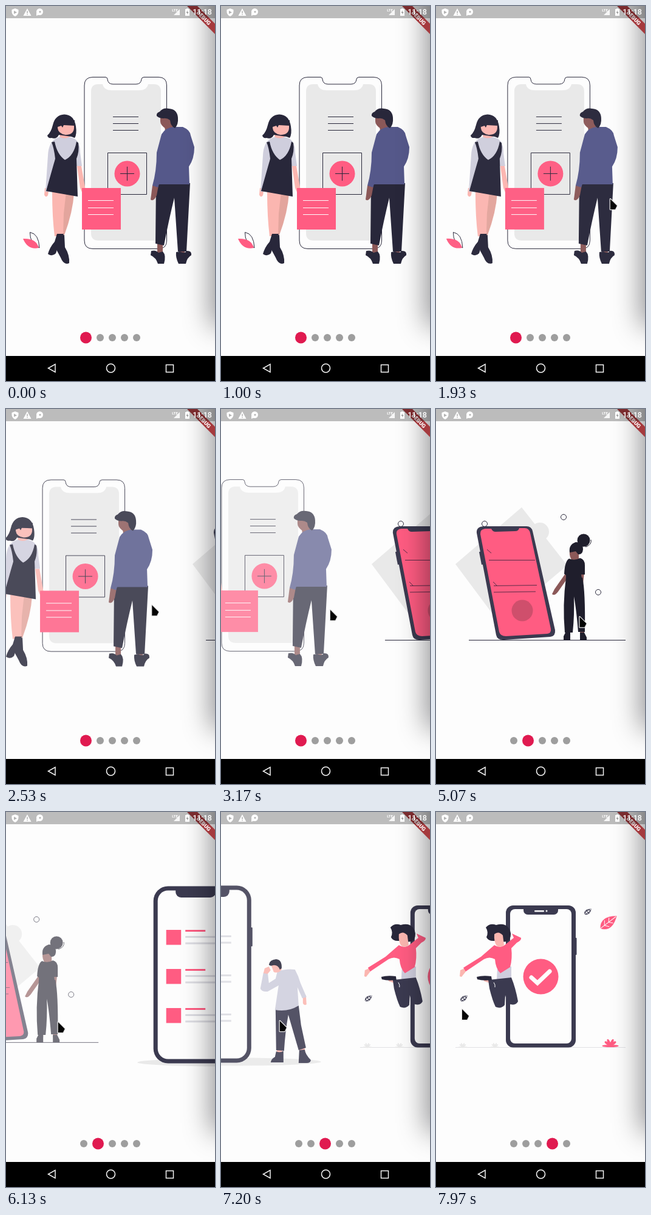
Recreate the animation shown at these times as an HTML page with a canvas. Size 344 by 614 pixels, loop 8 s.

```html
<!DOCTYPE html>
<html lang="en">
<head>
<meta charset="utf-8">
<title>Onboarding pager</title>
<style>
  html, body { margin: 0; width: 100%; height: 100%; overflow: hidden; background: #fdfdfd; }
  canvas { display: block; width: 344px; height: 614px; }
</style>
</head>
<body>
<canvas id="stage"></canvas>
<script>
const W = 344, H = 614, LOOP = 8000;
const dpr = window.devicePixelRatio || 1;
const INK = '#28273a', SLATE = '#3b3a50', RED = '#ff5c82', PALE = '#e9e9e9',
      LILAC = '#cfcedd', PINK = '#fbb6b0', BROWN = '#8b5858', PAPER = '#fdfdfd';

function prepare(canvas) {
  canvas.width = W * dpr;
  canvas.height = H * dpr;
  const c = canvas.getContext('2d');
  c.scale(dpr, dpr);
  return c;
}
const screen = prepare(document.getElementById('stage'));
const layer = prepare(document.createElement('canvas'));
let g = screen;

// Drawing helpers
const fill = (d, color) => { g.fillStyle = color; g.fill(new Path2D(d)); };
const line = (d, color, width = 1) => {
  g.strokeStyle = color;
  g.lineWidth = width;
  g.stroke(new Path2D(d));
};
const rect = (x, y, w, h, color) => { g.fillStyle = color; g.fillRect(x, y, w, h); };
const round = (x, y, w, h, r, color) => {
  g.fillStyle = color;
  g.beginPath();
  g.roundRect(x, y, w, h, r);
  g.fill();
};
const oval = (x, y, rx, ry, color, turn = 0) => {
  g.fillStyle = color;
  g.beginPath();
  g.ellipse(x, y, rx, ry, turn, 0, 7);
  g.fill();
};
const disc = (x, y, r, color) => oval(x, y, r, r, color);
const ring = (x, y, r, color, width = 1) => {
  g.strokeStyle = color;
  g.lineWidth = width;
  g.beginPath();
  g.arc(x, y, r, 0, 7);
  g.stroke();
};
const at = (x, y, turn, draw) => {
  g.save();
  g.translate(x, y);
  g.rotate(turn);
  draw();
  g.restore();
};

// Timing helpers
const clamp = (v, a = 0, b = 1) => Math.min(b, Math.max(a, v));
const smooth = v => v * v * (3 - 2 * v);

// Monotone cubic curve through [time, value] keys
function curve(keys, t) {
  const n = keys.length;
  if (t <= keys[0][0]) return keys[0][1];
  if (t >= keys[n - 1][0]) return keys[n - 1][1];
  let i = 0;
  while (keys[i + 1][0] < t) i++;
  const rate = k => (keys[k + 1][1] - keys[k][1]) / (keys[k + 1][0] - keys[k][0]);
  const slope = k => {
    if (k === 0 || k === n - 1) return 0;
    const a = rate(k - 1), b = rate(k);
    return a * b > 0 ? 2 * a * b / (a + b) : 0;
  };
  const [t0, v0] = keys[i], [t1, v1] = keys[i + 1];
  const d = t1 - t0, u = (t - t0) / d, e = smooth(u);
  return v0 + (v1 - v0) * e
    + d * u * (1 - u) * ((1 - u) * slope(i) - u * slope(i + 1));
}

const scrollKeys = [[0, 0], [1850, 0], [1930, 11], [2500, 66], [3170, 128], [3835, 172],
  [4030, 258], [4200, 318], [4420, 344], [5350, 344], [5800, 425], [6130, 503.5],
  [6300, 575], [6480, 664], [6700, 688], [6850, 688], [7200, 835], [7400, 863],
  [7530, 935], [7700, 1012], [7900, 1032]];
const cursorX = [[1300, 350], [1750, 298], [1850, 298], [1930, 287], [2500, 243],
  [3170, 180], [3835, 138], [4030, 52], [4150, 36], [4500, 36], [5150, 245],
  [5350, 245], [5800, 164], [6130, 86], [6280, 36], [6450, 36], [6800, 244],
  [6850, 244], [7200, 97], [7400, 62], [7530, 43]];
const cursorY = [[1300, 340], [1930, 316], [3170, 329], [4030, 333], [5200, 341],
  [6130, 344], [7200, 342], [7600, 323]];
const turns = [3835, 6180, 7400];

function scanPage() {
  // Outlined phone
  fill('M152 128H159Q161 138 174 138H219Q232 138 234 128H243Q255 128 255 140V372Q255 384 243 384H152Q140 384 140 372V140Q140 128 152 128Z', PALE);
  line('M143 116.5H164Q167 117 167 120Q168 128 176 128H214Q222 128 223 120Q223 117 227 116.5H251Q264.5 116.5 264.5 130V384Q264.5 397.5 251 397.5H143Q129 397.5 129 384V130Q129 116.5 143 116.5Z', INK);
  line('M176 181.5H218M176 192.5H218M176 203.5H218', INK);
  line('M167.5 240.5H231.5V308.5H167.5Z', INK);
  disc(199.5, 274.5, 21, RED);
  line('M199.5 263V286M188 274.5H211', INK);

  // Woman
  fill('M97 306H112Q110 338 96 375L92 374L94 330Z', '#e3a59d');
  fill('M78 304H99L95 340L94 377H80Q76 345 76 304Z', PINK);
  fill('M84 373H95L87 391Q84 399 82 405Q76 411 69 406Q72 395 80 386Z', INK);
  fill('M83 375H96L97 395Q105 408 104 421Q95 425 90 412L84 401Z', INK);
  fill('M64 298H71L69 310Q65 315 63 309Z', PINK);
  fill('M117 262H124L130 296Q132 303 126 307L122 298Z', PINK);
  fill('M84 216Q96 210 112 217Q122 222 122 240L125 262H116L113 252H80L72 304H65L69 245Q70 222 84 216Z', LILAC);
  fill('M90 206H104L105 214Q96 219 88 214Z', PINK);
  fill('M75 223L80 222Q84 243 97 252Q112 245 116 222L119 224Q121 238 116 250L118 312L66 303Q73 278 81 250Q79 232 75 223Z', INK);
  fill('M96 177.5Q112 178 115 197Q117 210 113 216L108 214L87 211Q83 219 75 216Q69 217 68 212Q74 207 77 195Q81 178 96 177.5Z', INK);
  fill('M85 195H112V200Q111 211 98 211Q86 209 85 200Z', PINK);
  fill('M83 187H113V196L95 195L93 199L91 196L85 198Z', INK);

  // Card
  rect(125, 298, 64, 68, RED);
  line('M135 318.5H177M135 330.5H177M135 341.5H177', PAPER);

  // Leaves
  line('M39.5 370.5Q54 373 55 396Q39 389 39.5 370.5Z', INK);
  fill('M28 381Q50 380 54 396Q36 400 28 381Z', RED);

  // Man
  fill('M249 388H258V406H249ZM285 396H294V406H285Z', BROWN);
  fill('M247 290H303L297 402H283L277 314Q268 350 260 392L246 389Z', INK);
  fill('M239 401Q247 399 251 404L258 402Q264 408 260 422H250Q247 412 238 408ZM280 403L286 402Q295 406 297 401Q306 400 305 408Q298 412 296 422H284Q279 412 280 403Z', INK);
  fill('M241 294H251L248 310Q243 321 238 317Z', BROWN);
  fill('M261 196H279V206H262Z', BROWN);
  fill('M256 210Q263 199 275 198H291Q303 203 304 212L310 231Q310 250 301 263L302 292H252L250 297L241 294Q248 270 248 240Z', '#55588a');
  fill('M254 181L274 178L276 192Q272 199 263 201Q254 195 254 189Z', BROWN);
  fill('M248 180Q247 175 253 173Q259 166 268 168Q282 169 283 183Q284 194 278 200Q271 197 270 187Q265 183 259 184Q252 184 248 180Z', INK);
}

function gamePage() {
  g.translate(-86, 0);
  fill('M118 254L227 161L302 256L190 350Z', PALE);
  disc(257, 201, 15, PALE);
  [[166, 188], [296, 177], [353, 300]].forEach(([x, y]) => ring(x, y, 4.5, INK));
  line('M140 378.5H398', INK);

  // Leaning phone
  fill('M157 234L161 233L165 254L161 255Z', SLATE);
  fill('M164 192H235Q243 192 245 200L282 362Q283 372 274 373L198 378Q187 379 185 370L153 203Q152 193 164 192Z', SLATE);
  fill('M167 196H177Q179 201 184 201L216 200Q222 200 223 195H232Q239 195 241 203L275 360Q276 367 269 368L201 372Q192 372 190 365L159 205Q158 197 167 196Z', RED);
  line('M173 247.5H249M181 289.5L252 288.5M181 300L250 299M170 230L177 236M180 283L187 290', '#5a2c48');
  disc(228, 330, 17.5, '#cf4f6c');

  // Woman with a bun
  const dark = '#1f1e2c';
  fill('M300 268L306 272L287 299Q281 307 277 303L281 295Z', BROWN);
  fill('M323 268H330L328 286L322 293L319 284Z', BROWN);
  fill('M299 362H307V370H299ZM323 362H330V370H323Z', BROWN);
  fill('M306 232H321V248H310Q305 242 306 232Z', BROWN);
  disc(329, 215, 10.5, dark);
  line('M341 214Q343 222 332 226', dark);
  fill('M306 235Q304 222 316 218Q328 218 328 230Q327 239 320 238L316 233Z', dark);
  fill('M305 245Q314 249 323 244Q331 246 331 256V271H325L327 284H300V272L297 270Q298 249 305 245Z', dark);
  fill('M300 276H327Q332 298 331 365H320Q317 328 313 307Q314 337 311 366H298Q294 320 300 276Z', dark);
  fill('M299 366H307V378H296V372ZM323 366H330L334 374V378H323Z', dark);
}

function listPage() {
  oval(172, 410, 140, 6.5, PALE);
  round(195, 190, 4, 31, 1, SLATE);
  round(58.5, 121.5, 138.5, 290, 24, SLATE);
  round(65.5, 128.5, 124.5, 276, 17, PAPER);
  round(95, 125, 66, 15, [0, 0, 9, 9], SLATE);
  [193, 257, 321].forEach(y => {
    rect(79.5, y, 24.5, 24.5, RED);
    rect(111, y, 33, 3, RED);
    rect(111, y + 10, 53, 3, '#dcdce2');
    rect(111, y + 20.5, 53, 3, '#dcdce2');
  });

  // Thinking man
  g.translate(147, 0);
  fill('M92 386H101V397H92ZM128 384L137 383L139 394H130Z', PINK);
  fill('M135 302L140 301L141 316Q137 319 135 314Z', PINK);
  fill('M90 322L128 318L132 350L140 387L128 391L111 333Q106 360 104 392L91 391Z', SLATE);
  fill('M91 393Q98 396 103 392V411H82Q83 405 89 402ZM129 391L138 390Q139 398 148 407Q148 412 141 412H128Z', SLATE);
  fill('M93 262Q108 257 122 259Q128 270 131 281L141 304L134 306L126 288L128 318Q110 329 89 325L95 285L77 295Q67 296 65 290L70 264L77 263L79 281L90 274Z', LILAC);
  fill('M70 265L72 257L79 254L82 260L77 266Z', PINK);
  fill('M82 250L98 249L100 259Q95 266 87 263Z', PINK);
  fill('M79 251Q80 243 91 242Q101 243 100 257L97 259Q94 251 86 252Q81 254 79 251Z', INK);
}

function leaf(x, y, size, color) {
  at(x, y, -0.65, () => {
    g.scale(size, size);
    fill('M-1 0Q-.3 -1 1 0Q-.3 1 -1 0Z', color);
    line('M-1 0H.9M-.5 0L-.2 -.38M-.5 0L-.2 .38M0 0L.3 -.32M0 0L.3 .32', PAPER, 1 / size);
  });
}

function sprout(x, y, size, color) {
  [-1, -0.45, 0.45, 1].forEach(a => at(x, y, a, () => oval(0, -size * 0.55, size * 0.2, size * 0.5, color)));
  oval(x, y + 1, size * 1.3, size * 0.2, color);
}

function donePage() {
  line('M32 385.5H312', '#d4d4da', 0.7);
  round(228, 206, 3.5, 28, 1, SLATE);
  round(115, 153, 115, 232.5, 12, SLATE);
  round(122, 159, 101, 220, 8, PAPER);
  round(144, 156, 57, 12, [0, 0, 7, 7], SLATE);
  round(162, 161, 16, 2.5, 1, PAPER);
  disc(182, 162, 1.5, PAPER);
  disc(172.5, 269.5, 29, RED);
  g.lineCap = 'round';
  line('M157 271L167 280L187 261', PAPER, 7);
  g.lineCap = 'butt';
  leaf(250, 163, 7.5, SLATE);
  leaf(46, 305, 7.5, SLATE);
  leaf(284, 180.5, 17, RED);
  sprout(287, 382, 10.5, RED);
  sprout(44, 384, 6, PALE);
  sprout(97, 384, 6, PALE);

  // Jumping woman
  fill('M82 189Q89 181 99 185Q112 181 119 189Q126 198 121 209Q114 215 106 211L94 211Q86 211 83 205Q87 197 82 189Z', INK);
  fill('M40 259L47 256L50 260L42 270L39 269Z', PINK);
  fill('M78 271L91 274L92 281L79 277Z', PINK);
  fill('M101 254L124 253L124 275H100Z', LILAC);
  fill('M86 275L124 271Q131 288 135 310Q132 317 123 315Q117 314 114 300L113 316Q107 323 98 319Q93 309 88 289Z', SLATE);
  line('M95 279Q98 283 97 287', PAPER);
  fill('M67 270Q77 267 91 269L92 275Q78 277 68 274Z', INK);
  fill('M96 218Q106 224 114 217L128 206L125 199L140 206Q141 210 133 214L124 223Q126 240 122 254L106 264Q98 256 97 241Q88 236 79 241L49 261L45 255L74 237Z', RED);
  fill('M96 200Q103 194 110 202L112 218Q106 223 100 219Q95 213 96 200Z', PINK);
}

const pages = [
  { draw: scanPage, dim: 0.82 },
  { draw: gamePage, dim: 0.82 },
  { draw: listPage, dim: 0.3 },
  { draw: donePage, dim: 0.82 }
];

function drawPage(page, offset) {
  if (Math.abs(offset) >= W) return;
  const gone = clamp(-offset / W);
  g = layer;
  g.clearRect(0, 0, W, H);
  g.save();
  g.translate(offset, -2.4 * gone);
  page.draw();
  g.restore();
  g = screen;
  g.globalAlpha = 1 - page.dim * gone;
  g.drawImage(layer.canvas, 0, 0, W, H);
  g.globalAlpha = 1;
}

function drawDots(t) {
  const steps = turns.map(s => smooth(clamp((t - s) / 300)));
  const mix = (a, b, w) => Math.round(a + (b - a) * w);
  let x = 122;
  for (let i = 0; i < 5; i++) {
    const w = (i ? steps[i - 1] || 0 : 1) - (steps[i] || 0);
    const r = 6 + 3.5 * w;
    disc(x + r, 543, r, `rgb(${mix(158, 224, w)},${mix(158, 26, w)},${mix(158, 80, w)})`);
    x += 2 * r + 8;
  }
}

function drawCursor(t) {
  if (t < 1300) return;
  at(curve(cursorX, t), curve(cursorY, t), 0, () => {
    const arrow = 'M0 0L11 11L8 17H0Z';
    g.lineJoin = 'round';
    line(arrow, '#e4e4e4', 2.5);
    fill(arrow, '#050505');
    g.lineJoin = 'miter';
  });
}

function drawEdgeShadow() {
  g.save();
  g.shadowColor = 'rgba(0,0,8,.42)';
  g.shadowBlur = 42 * dpr;
  g.shadowOffsetX = -400 * dpr;
  rect(737, -100, 200, 625, '#000');
  g.restore();
}

function drawChrome() {
  // Corner ribbon
  fill('M298 0H315L344 29V46Z', '#a53a3e');
  g.textAlign = 'center';
  g.textBaseline = 'middle';
  at(325.5, 19.5, Math.PI / 4, () => {
    g.fillStyle = '#fff';
    g.font = '900 9px Roboto, sans-serif';
    g.fillText('DEBUG', 0, 0.5);
  });

  // Status bar
  rect(0, 0, W, 20, 'rgba(0,0,0,.26)');
  fill('M15 4L20.500 6V10Q20 14.500 15 17Q10 14.500 9.500 10V6Z', '#fff');
  fill('M13 7.500L18 10.500L13 13Z', '#b4b4b4');
  fill('M35 4L41.500 16H28.500Z', '#fff');
  rect(34.3, 8, 1.5, 4, '#b4b4b4');
  rect(34.3, 13, 1.5, 1.5, '#b4b4b4');
  disc(55.5, 9.5, 5.5, '#fff');
  fill('M50 11V16L55 14Z', '#fff');
  disc(56, 9.5, 1.5, '#b4b4b4');
  fill('M286 5V15H276Z', '#f6f6f6');
  g.fillStyle = '#fff';
  g.font = 'bold 6px Roboto, sans-serif';
  g.fillText('LTE', 278, 7);
  rect(295, 5, 7, 11, '#fff');
  rect(297, 4, 3, 1, '#fff');
  fill('M299.500 7L296.500 11H298.500L298 14L300.500 10H298.500Z', '#8c8c8c');
  g.fillStyle = '#fff';
  g.font = '500 12.5px Roboto, sans-serif';
  g.fillText('11:18', 323, 10.5);

  // Navigation bar
  rect(0, 573, W, 41, '#000');
  const key = '#f4f4f4';
  line('M81 586.500V599.500L69.500 593Z', key, 1.5);
  ring(172.5, 593, 7, key, 1.6);
  line('M263.500 587.500H275.500V599.500H263.500Z', key, 1.5);
}

function render(t) {
  rect(0, 0, W, H, PAPER);
  const scroll = curve(scrollKeys, t);
  pages.forEach((page, i) => drawPage(page, i * W - scroll));
  drawDots(t);
  drawEdgeShadow();
  drawChrome();
  drawCursor(t);
}

const start = performance.now();
function tick() {
  render((performance.now() - start) % LOOP);
  requestAnimationFrame(tick);
}
tick();
</script>
</body>
</html>
```
